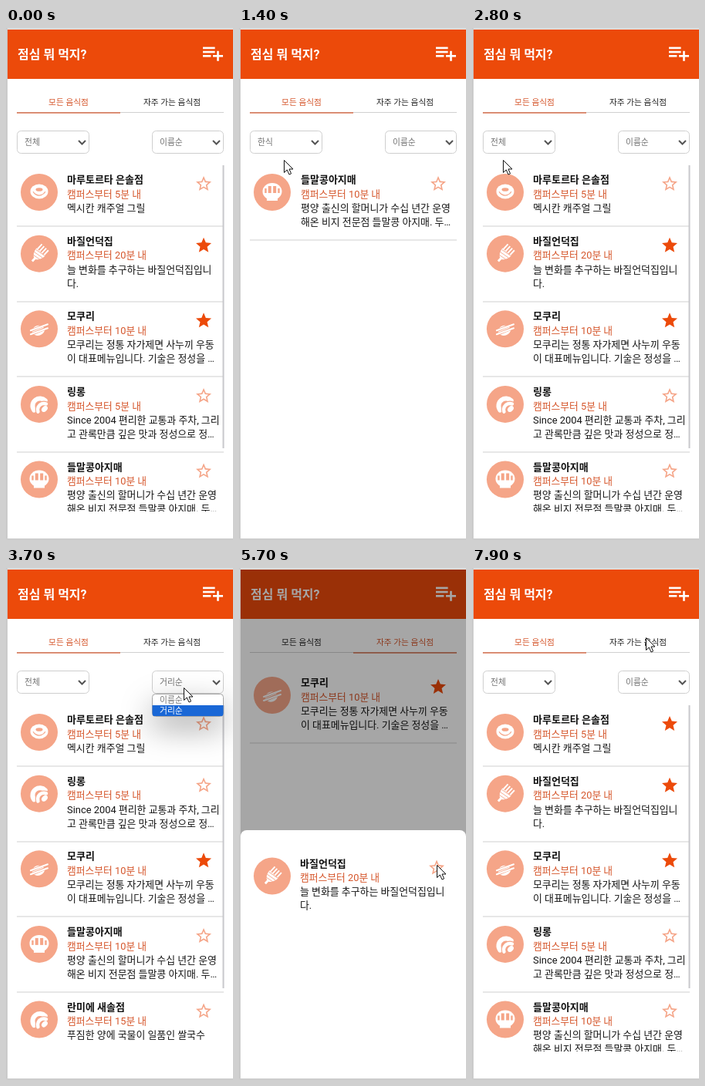
Recreate the animation shown at these times as an HTML page with a canvas. Size 294 by 664 pixels, loop 8 s.

```html
<!DOCTYPE html>
<html lang="ko">
<head>
<meta charset="utf-8">
<title>점심 뭐 먹지?</title>
<style>
html, body { margin: 0; width: 100%; height: 100%; overflow: hidden; background: #fff; }
canvas { display: block; width: 294px; height: 664px; }
</style>
</head>
<body>
<canvas id="stage"></canvas>
<script>
const W = 294, H = 664, LOOP = 8000;
const LIST_TOP = 177.5, ROW = 14, MENU_TOP = 164;
const canvas = document.getElementById('stage');
const dpr = window.devicePixelRatio || 1;
canvas.width = W * dpr;
canvas.height = H * dpr;
const ctx = canvas.getContext('2d');

const FONT = "Roboto, 'Noto Sans CJK KR', 'Noto Sans CJK', sans-serif";
const ORANGE = '#ec4a0a', PALE = '#f5a588', ACCENT = '#d5552a', LINE = '#d0d0d0';

const CATS = ['전체', '한식', '중식', '일식', '양식', '아시안', '기타'];
const SORTS = ['이름순', '거리순'];

// Listed in name order
const PLACES = [
  { id: 'a', cat: '기타', icon: donut, name: '마루토르타 은솔점', min: 5, text: ['멕시칸 캐주얼 그릴'] },
  { id: 'b', cat: '양식', icon: pasta, name: '바질언덕집', min: 20, text: ['늘 변화를 추구하는 바질언덕집입니', '다.'] },
  { id: 'c', cat: '일식', icon: sushi, name: '모쿠리', min: 10, text: ['모쿠리는 정통 자가제면 사누끼 우동', '이 대표메뉴입니다. 기술은 정성을 …'] },
  { id: 'd', cat: '중식', icon: dumpling, name: '링롱', min: 5, text: ['Since 2004 편리한 교통과 주차, 그리', '고 관록만큼 깊은 맛과 정성으로 정…'] },
  { id: 'e', cat: '한식', icon: bowl, name: '들말콩아지매', min: 10, text: ['평양 출신의 할머니가 수십 년간 운영', '해온 비지 전문점 들말콩 아지매. 두…'] },
  { id: 'f', cat: '아시안', icon: dumpling, name: '란미에 새솔점', min: 15, text: ['푸짐한 양에 국물이 일품인 쌀국수'] }
];

// Places the pointer visits
const spot = {
  cat: { x: 62, y: 150 },
  sort: { x: 230, y: 154 },
  tab: i => ({ x: 80 + i * 145, y: 90 }),
  option: (x, row) => ({ x, y: MENU_TOP + (row + 0.5) * ROW }),
  star: y => ({ x: 256, y })
};

// Each step: the pointer arrives at a spot, then the screen changes
const START = { cat: 0, sort: 0, menu: '', tab: 0, sheet: false, favs: 'bc' };
const SHOW = 400, MOVE = 260, PRESS = 50;
const STEPS = [
  [SHOW, { x: 180, y: 560 }],
  [700, { x: 103, y: 298 }],
  [950, spot.cat, { menu: 'cat' }],
  [1250, spot.option(56, 1), { menu: '', cat: 1 }],
  [1600, spot.cat, { menu: 'cat' }],
  [2120, spot.option(51, 5), { menu: '', cat: 5 }],
  [2480, spot.cat, { menu: 'cat' }],
  [2800, spot.option(40, 0), { menu: '', cat: 0 }],
  [3100, spot.sort, { menu: 'sort' }],
  [3350, spot.option(225, 1), { menu: '', sort: 1 }],
  [3600, spot.sort, { menu: 'sort' }],
  [3980, spot.option(218, 0), { menu: '', sort: 0 }],
  [4650, spot.tab(1), { tab: 1 }],
  [5000, { x: 203, y: 156 }],
  [5150, { x: 203, y: 156 }, { sheet: true }],
  [5600, spot.star(385), { favs: 'c' }],
  [6050, { x: 213, y: 605 }, { sheet: false }],
  [6300, { x: 213, y: 512 }],
  [6750, spot.tab(0), { tab: 0 }],
  [7100, spot.star(281), { favs: 'bc' }],
  [7450, spot.star(202), { favs: 'abc' }],
  [7850, spot.tab(1)]
];

const STAR = 'M22 9.24l-7.19-.62L12 2 9.19 8.63 2 9.24l5.46 4.73L5.82 21 12 17.27 18.18 21l-1.63-7.03z';
const starFull = new Path2D(STAR);
const starLine = new Path2D(STAR + 'M12 15.4l-3.76 2.27 1-4.28-3.32-2.88 4.38-.38L12 6.1l1.71 4.04 4.38.38-3.32 2.88 1 4.28z');
const arrow = new Path2D('M.5 .5V16.5L4.3 13 7 19 9.6 17.9 7 12H12z');
const beam = new Path2D('M-3 -7H-1L0 -6 1 -7H3M0 -6V6M-3 7H-1L0 6 1 7H3');

function rect(x, y, w, h, color) {
  ctx.fillStyle = color;
  ctx.fillRect(x, y, w, h);
}

function round(x, y, w, h, r) {
  ctx.beginPath();
  ctx.roundRect(x, y, w, h, r);
}

function text(str, x, mid, size, color, weight = 400, align = 'left') {
  ctx.font = `${weight} ${size}px ${FONT}`;
  ctx.fillStyle = color;
  ctx.textAlign = align;
  ctx.fillText(str, x, mid + size * 0.36);
}

function at(x, y, draw, scale = 1, turn = 0) {
  ctx.save();
  ctx.translate(x, y);
  ctx.rotate(turn);
  ctx.scale(scale, scale);
  draw();
  ctx.restore();
}

function oval(x, y, rx, ry, color, turn = 0) {
  ctx.fillStyle = color;
  ctx.beginPath();
  ctx.ellipse(x, y, rx, ry, turn, 0, 7);
  ctx.fill();
}

function stroke(color, width, x1, y1, x2, y2) {
  ctx.strokeStyle = color;
  ctx.lineWidth = width;
  ctx.beginPath();
  ctx.moveTo(x1, y1);
  ctx.lineTo(x2, y2);
  ctx.stroke();
}

function arc(x, y, r, from, to, color, width) {
  ctx.strokeStyle = color;
  ctx.lineWidth = width;
  ctx.beginPath();
  ctx.arc(x, y, r, from, to);
  ctx.stroke();
}

function donut() {
  oval(0, -1, 11.5, 9.5, '#fff');
  oval(0, -3.5, 4.5, 2.3, PALE);
  arc(0, -5, 9, 0.5, 2.64, PALE, 1.2);
}

function pasta() {
  at(0, 0, () => {
    ctx.fillStyle = '#fff';
    ctx.fill(new Path2D('M-8 -3H8Q7 6 1.5 9V14H-1.5V9Q-7 6 -8 -3z'));
    for (let x = -6; x <= 6; x += 4) stroke('#fff', 2, x, -3, x, -12);
    for (let y = -2; y < 8; y += 4) stroke(PALE, 0.9, -7, y + 1, 7, y - 1);
  }, 0.95, 0.75);
}

function sushi() {
  ctx.lineCap = 'round';
  oval(-1, 2, 8, 6.5, '#fff', -0.3);
  for (const y of [-1, 4]) {
    stroke(PALE, 3.6, -8, y + 2, 9, y - 5);
    stroke('#fff', 2, -11, y + 3, 11, y - 5);
  }
}

function dumpling() {
  ctx.lineCap = 'round';
  arc(1, 2, 9.5, 2.5, 5.5, '#fff', 6);
  arc(6, 7, 8, 2.8, 5.1, PALE, 6.5);
  arc(6, 7, 8, 2.8, 5.1, '#fff', 4.5);
  oval(7, 6, 4.5, 3.2, '#fff', -0.8);
}

function bowl() {
  oval(0, -1, 12.5, 11, '#fff');
  rect(-7, 7, 14, 4, '#fff');
  for (const side of [-1, 1]) {
    rect(side * 3.2 - 2, -8, 4, 9, PALE);
    rect(side * 8.5 - 1.2, -5, 2.4, 6, PALE);
  }
}

function star(x, y, on) {
  at(x - 12, y - 11.5, () => {
    ctx.fillStyle = on ? ORANGE : PALE;
    ctx.fill(on ? starFull : starLine, 'evenodd');
  });
}

function place(p, top, fav, shift) {
  oval(43, top + 35.5, 24, 24, PALE);
  at(43, top + 35.5, p.icon);
  const x = 79 + shift * 0.5;
  text(p.name, x, top + 19, 13, '#111', 700);
  text(`캠퍼스부터 ${p.min}분 내`, x, top + 37.5, 12.8, ACCENT);
  p.text.forEach((line, i) => text(line, x, top + 55.7 + i * 18, 12.9, '#151515'));
  star(256 + shift, top + 24, fav);
}

function list(items, top, s, scrolls) {
  items.forEach(p => {
    place(p, top, s.favs.includes(p.id), scrolls ? 0 : 2);
    top += 61.8 + 17.9 * p.text.length;
    rect(14, Math.round(top) - 0.5, 268, 1, LINE);
  });
}

function header() {
  rect(2, 2, 292, 64, ORANGE);
  text('점심 뭐 먹지?', 15, 34.2, 16, '#fff', 700);
  at(252.4, 16.8, () => {
    for (let i = 0; i < 3; i++) rect(2, 6 + i * 4, i < 2 ? 12 : 8, 2, '#fff');
    rect(16, 10, 2, 10, '#fff');
    rect(12, 14, 10, 2, '#fff');
  }, 1.3);
}

function tabs(active) {
  rect(14, 109, 268, 1, LINE);
  ['모든 음식점', '자주 가는 음식점'].forEach((label, i) => {
    const on = i === active;
    text(label, 81 + i * 134, 96, 10.7, on ? ACCENT : '#222', 400, 'center');
    if (on) rect(14 + i * 134, 109.4, 134, 1.2, ACCENT);
  });
}

function select(x, w, label) {
  round(x + 0.5, 133.5, w - 1, 29, 5);
  ctx.strokeStyle = '#cfcfcf';
  ctx.lineWidth = 1;
  ctx.stroke();
  text(label, x + 10, 148, 10.8, '#707070');
  ctx.strokeStyle = '#555';
  ctx.lineWidth = 2;
  at(x + w - 9.5, 150.5, () => ctx.stroke(new Path2D('M-4.5 -4.5L0 0 4.5 -4.5')));
}

function menu(x, w, options, chosen, mouse) {
  const row = Math.floor((mouse.y - MENU_TOP) / ROW);
  const lit = options[row] ? row : chosen;
  ctx.save();
  round(x + 0.5, MENU_TOP - 0.5, w - 1, options.length * ROW + 1, 4);
  ctx.save();
  ctx.shadowColor = 'rgba(0,0,0,.36)';
  ctx.shadowBlur = 40 * dpr;
  ctx.shadowOffsetY = 15 * dpr;
  ctx.fillStyle = '#fff';
  ctx.fill();
  ctx.restore();
  ctx.strokeStyle = '#a5a5a5';
  ctx.lineWidth = 1;
  ctx.stroke();
  ctx.clip();
  rect(x, MENU_TOP + lit * ROW, w, ROW, '#1967d6');
  options.forEach((o, i) => text(o, x + 10, MENU_TOP + 7 + i * ROW, 10.8, i === lit ? '#fff' : '#777'));
  ctx.restore();
}

function sheet(s) {
  rect(0, 2, W, H - 2, 'rgba(0,0,0,.35)');
  round(2, 340, 292, 330, 8);
  ctx.fillStyle = '#fff';
  ctx.fill();
  place(PLACES[1], 364, s.favs.includes('b'), 0);
}

function pointer(m, t) {
  at(m.x, m.y, () => {
    ctx.strokeStyle = '#111';
    ctx.lineWidth = 1;
    ctx.fillStyle = '#fff';
    const overText = t < 850;
    if (!overText) ctx.fill(arrow);
    ctx.stroke(overText ? beam : arrow);
  });
}

function mouseAt(t) {
  let [from, pos] = STEPS[0];
  for (const [when, to] of STEPS) {
    const end = when - PRESS, begin = Math.max(from, end - MOVE);
    const u = Math.min(1, Math.max(0, (t - begin) / (end - begin)));
    const e = u * u * (3 - 2 * u);
    pos = { x: pos.x + (to.x - pos.x) * e, y: pos.y + (to.y - pos.y) * e };
    from = when;
    if (t < when) break;
  }
  return { x: Math.round(pos.x), y: Math.round(pos.y) };
}

function stateAt(t) {
  return STEPS.reduce((s, [when, , change]) => t >= when ? { ...s, ...change } : s, START);
}

function allPlaces(s, mouse) {
  const items = PLACES.filter(p => !s.cat || p.cat === CATS[s.cat]);
  if (s.sort) items.sort((a, b) => a.min - b.min);
  const scrolls = items.length > 4;
  select(14, 94, CATS[s.cat]);
  select(189, 93, SORTS[s.sort]);
  ctx.save();
  ctx.beginPath();
  ctx.rect(0, 178, W, 449);
  ctx.clip();
  list(items, LIST_TOP, s, scrolls);
  if (scrolls) rect(280.5, 178, 2, 367, '#c8c8cc');
  ctx.restore();
  if (s.menu === 'cat') menu(14, 94, CATS, s.cat, mouse);
  if (s.menu === 'sort') menu(189, 93, SORTS, s.sort, mouse);
}

function draw(t) {
  const s = stateAt(t), mouse = mouseAt(t);
  ctx.setTransform(dpr, 0, 0, dpr, 0, 0);
  rect(0, 0, W, H, '#fff');
  header();
  tabs(s.tab);
  if (s.tab) list(PLACES.filter(p => s.favs.includes(p.id)), 129.5, s, false);
  else allPlaces(s, mouse);
  if (s.sheet) sheet(s);
  rect(0, 0, W, 1.5, '#d4d4d4');
  rect(0, 0, 2, H, '#cbcbcb');
  rect(0, 662, W, 2, '#cdcdcd');
  if (t >= SHOW) pointer(mouse, t);
}

const begin = performance.now();
function tick() {
  draw((performance.now() - begin) % LOOP);
  requestAnimationFrame(tick);
}
tick();
</script>
</body>
</html>
```
